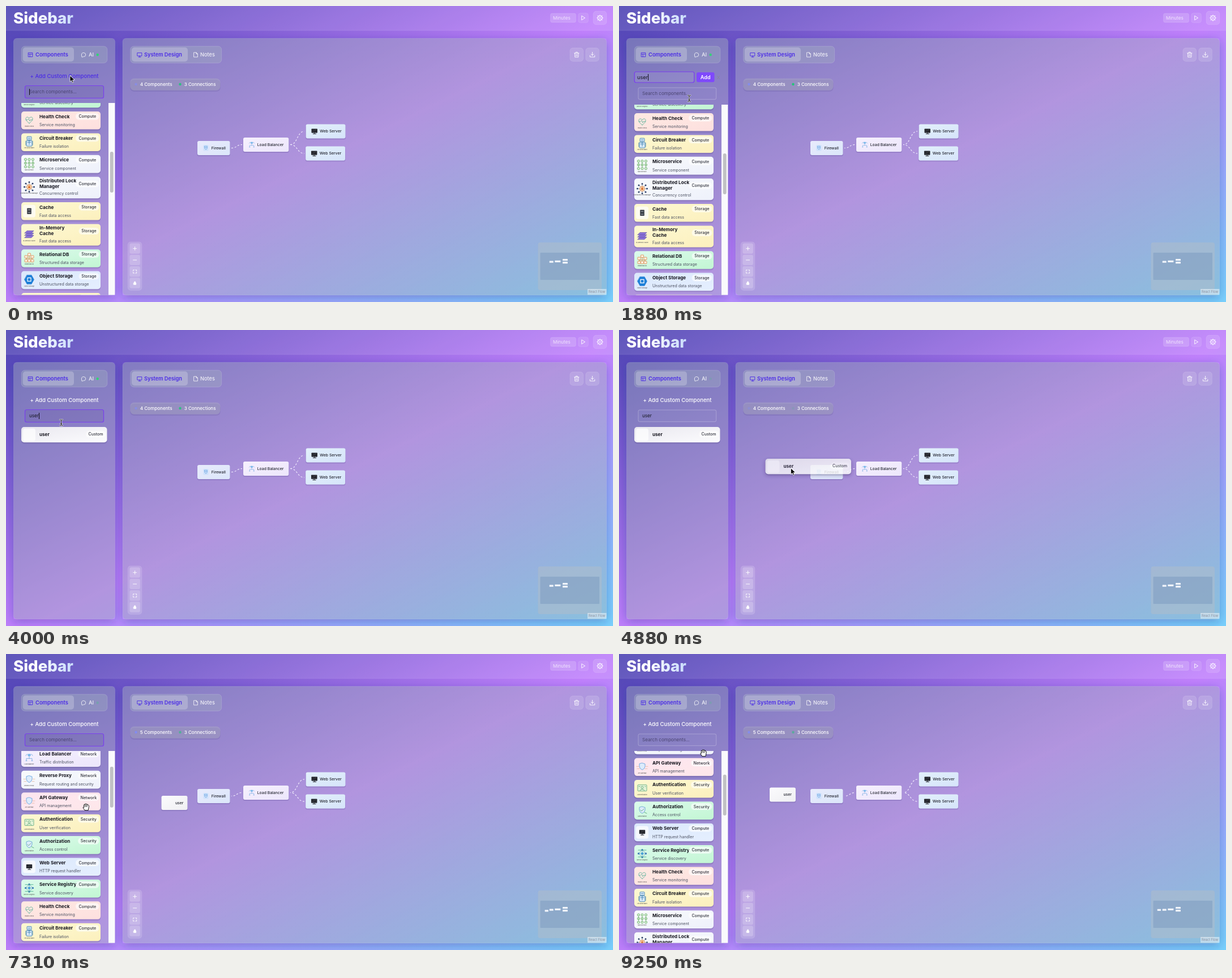
Write an HTML page that moves like this. It is 1072x522 px and loops after 9310 ms.

```html
<!DOCTYPE html>
<html lang="en">
<head>
<meta charset="utf-8">
<title>Sidebar</title>
<style>
html, body { margin: 0; width: 100%; height: 100%; overflow: hidden; background: #8a60dc; }
svg { display: block; width: 100vw; height: 100vh; font-family: Inter, "Open Sans", sans-serif; }
text { white-space: pre; }
</style>
</head>
<body>
<svg viewBox="0 0 1072 522">
  <defs>
    <linearGradient id="bg" x1="0" y1="0" x2="1" y2="1">
      <stop offset="0" stop-color="#4c43b2"/><stop offset=".52" stop-color="#c081fc"/><stop offset="1" stop-color="#78d0fb"/>
    </linearGradient>
    <linearGradient id="logo"><stop offset=".35" stop-color="#fff"/><stop offset="1" stop-color="#c9dcfd"/></linearGradient>
    <pattern id="dots" width="6.2" height="6.2" patternUnits="userSpaceOnUse"><circle cx="3" cy="3" r=".4" fill="#4a62c0" opacity=".15"/></pattern>
    <filter id="soft" x="-20%" y="-50%" width="140%" height="200%"><feGaussianBlur stdDeviation="3"/></filter>
    <filter id="glow" x="-30%" y="-30%" width="160%" height="160%"><feGaussianBlur stdDeviation="8"/></filter>
    <clipPath id="gaps"><path clip-rule="evenodd" d="M0 0H1072V522H0ZM13.3 57H192.5V510H13.3ZM206 57H1060.5V510H206Z"/></clipPath>
    <clipPath id="view"><rect x="13" y="171" width="180" height="338.5"/></clipPath>
    <clipPath id="viewLow"><rect x="13" y="174" width="180" height="335.5"/></clipPath>
  </defs>
  <g id="base"></g>
  <g id="live"></g>
</svg>
<script>
const LOOP = 9310, $ = id => document.getElementById(id);
const white = a => `rgba(255,255,255,${a})`;
const INK = '#16161f', GREY = '#4b5060', VIOLET = '#4a2be6';

const rect = (x, y, w, h, r, fill, more = '') =>
  `<rect x="${x}" y="${y}" width="${w}" height="${h}" rx="${r}" fill="${fill}" ${more}/>`;
const line = a => `stroke="${a}" stroke-width=".8"`;
const circle = (x, y, r, fill, more = '') => `<circle cx="${x}" cy="${y}" r="${r}" fill="${fill}" ${more}/>`;
// y is the visual middle of the line
const text = (s, x, y, size, weight = 400, fill = INK, more = '') =>
  `<text x="${x}" y="${y + size * .35}" font-size="${size}" font-weight="${weight}" fill="${fill}" ${more}>${s}</text>`;
const path = (d, color, w = .9, fill = 'none') =>
  `<path d="${d}" fill="${fill}" stroke="${color}" stroke-width="${w}" stroke-linecap="round" stroke-linejoin="round"/>`;
const at = (x, y, s, k = 1) => `<g transform="translate(${x} ${y}) scale(${k})">${s}</g>`;
const ring = (n, r, f) => Array.from({length: n}, (_, i) => f(r * Math.cos(i * 2 * Math.PI / n), r * Math.sin(i * 2 * Math.PI / n))).join('');
const spokes = (n, r, ink, dot) => ring(n, r, (x, y) => path(`M0 0L${x} ${y}`, ink, .6) + circle(x, y, 1.4, dot));

const shield = c => path('M0-6L5-4.4V0Q4.4 4.4 0 6Q-4.4 4.4-5 0V-4.4Z', c, .8, '#dcebfb');
const icons = {
  globe: circle(0, 0, 6, '#dcebfb', line('#4a8fd8')) + path('M-6 0H6M0-6Q-5 0 0 6Q5 0 0-6', '#4a8fd8', .6),
  wall: rect(-6, -7, 12, 14, 2, '#cfe2fb') + path('M-3-4H3V0Q2 3 0 4Q-2 3-3 0Z', '#4a8fd8', .8) + path('M-1.5-1H1.5', '#4a8fd8'),
  scale: rect(-2.5, -6, 5, 4, .8, '#7ab8ea') + path('M0-2V2M-5 6V2H5V6M-6 6H-4M4 6H6M-6-3Q-4-7-3-5M6-3Q4-7 3-5', '#6ba3dc', .8),
  shield: shield('#5a9bdc') + path('M-10 0H-6M6 0H10M-9 4H-5M5 4H9', '#e0a080', .6),
  cert: rect(-8, -6, 16, 11, 1, '#e3f2d5', line('#5aa67a')) + circle(0, -1.5, 2, 'none', line('#5aa67a')) + path('M-4 4Q0-1 4 4M-6-3H-4M5-3H6', '#5aa67a'),
  lock: shield('#5aa0c8') + path('M-3 0L-1 2L3-2M4 4L8 6', '#5aa67a'),
  screen: rect(-5.5, -4.5, 11, 7.5, .8, '#25272d') + path('M0 3V5M-2.5 5H3', '#25272d', 1.1) + path('M-4 1L3-3', '#4a4e58', .7),
  mesh: ring(4, 6.5, (x, y) => path(`M0 0L${x} ${y}M${x} ${y}L${-y} ${x}`, '#3e7bb8', .6) + circle(x, y, 1.6, '#3e7bb8')) + path('M-7-6H7M-7 6H7', '#3fa98a', .8) + circle(0, 0, 2.2, '#45a0d8'),
  heart: path('M0 6Q-7 1-6-3Q-4-7 0-3Q4-7 6-3Q7 1 0 6ZM-6 0H-3L-1-2L1 2L2 0H6', '#4fae95', .8),
  breaker: rect(-4, -9, 8, 6, 1, '#d7e9f7', line('#2f76ad')) + rect(-5, -2, 10, 10, 1, '#d7e9f7', line('#2f76ad')) + path('M0-3V5M-3 1H3M-6-1V6M6-1V6M-2-6H2', '#2f76ad', .8),
  cells: [0, 1, 2, 3, 4, 5, 6, 7, 8].map(i => circle(i % 3 * 6.5 - 6.5, (i / 3 | 0) * 6.5 - 7, 2.1, '#d8f0d6', line('#5da55c'))).join('') + path('M-6.5-5V4M0-5V4M6.5-5V4', '#5da55c', .5),
  hub: spokes(8, 8.5, '#53627a', '#2d3f66') + circle(0, 0, 4.4, '#f8d9b8', line('#e0823c')) + rect(-1.8, -1, 3.6, 3, .5, '#d96b24') + path('M-1-1V-2.4H1V-1', '#d96b24', .7),
  drive: rect(-4, -5.5, 8, 11, .8, '#3c4048') + path('M-2-2.5H2M-2 2.5H2', '#aab0ba', 1),
  layers: [4, 0, -4].map(y => path(`M-8 ${y + 2}L-4 ${y - 2}H8L4 ${y + 2}Z`, '#5a47a8', .7, '#8a72d8')).join(''),
  tables: path('M0-3V1M-5 4V1H5V4', '#d98a4c') + [[-2.5, -8], [-8, 3], [-2.5, 3], [3, 3], [-8, -4], [3, -4]].map(p => rect(p[0], p[1], 5, 4.5, .6, '#fdeedd', line('#d98a4c'))).join(''),
  hex: path('M-4-8H4L8.5 0L4 8H-4L-8.5 0Z', '#1d78cf', .5, '#1f80d8') + path('M-3-3H3V3H-3Z', '#fff', 1.2),
  bus: rect(-10.5, -10, 21, 18, 1, '#cfe8f8') + at(0, -1, spokes(4, 7, '#4b93cc', '#3f8fce') + ring(4, 7, (x, y) => circle(x + y * .8, y - x * .8, 1.1, '#3f8fce')) + rect(-2, -2, 4, 4, 1, '#3f8fce'))
};

const fills = {
  pink: ['#fde6f0', '#fee7ea'], red: ['#ffe9e2', '#fde0df'], yellow: ['#fdf8d2', '#fcf0bd'], green: ['#dcfaec', '#c2f6d3'],
  blue: ['#dbe8fb', '#e5efff'], slate: ['#f8fafc', '#eef1fb'], plain: ['#e9e8ef', '#fcfcfe'], lilac: ['#f6f0fe', '#ece6fb'],
  ice: ['#e2f0fb', '#d6e4fa'], dusk: ['#e8ebfc', '#dbe6fa'], chalk: ['#fbfbfd', '#efeff2']
};
document.querySelector('defs').insertAdjacentHTML('beforeend', Object.entries(fills).map(([k, [a, b]]) =>
  `<linearGradient id="${k}" x2="1" y2="1"><stop stop-color="${a}"/><stop offset="1" stop-color="${b}"/></linearGradient>`).join(''));

// title, subtitle, badge, fill, icon, white tile
const items = [
  ['DNS', 'Name resolution', 'Network', 'blue', 'globe'],
  ['CDN', 'Content delivery', 'Network', 'green', 'globe'],
  ['Firewall', 'Traffic filtering', 'Security', 'red', 'wall'],
  ['Load Balancer', 'Traffic distribution', 'Network', 'lilac', 'scale'],
  ['Reverse Proxy', 'Request routing and security', 'Network', 'slate', 'shield'],
  ['API Gateway', 'API management', 'Network', 'pink', 'shield'],
  ['Authentication', 'User verification', 'Security', 'yellow', 'cert'],
  ['Authorization', 'Access control', 'Security', 'green', 'lock'],
  ['Web Server', 'HTTP request handler', 'Compute', 'blue', 'screen', 1],
  ['Service Registry', 'Service discovery', 'Compute', 'green', 'mesh'],
  ['Health Check', 'Service monitoring', 'Compute', 'red', 'heart'],
  ['Circuit Breaker', 'Failure isolation', 'Compute', 'yellow', 'breaker'],
  ['Microservice', 'Service component', 'Compute', 'slate', 'cells'],
  ['Distributed Lock|Manager', 'Concurrency control', 'Compute', 'slate', 'hub'],
  ['Cache', 'Fast data access', 'Storage', 'yellow', 'drive', 1],
  ['In-Memory|Cache', 'Fast data access', 'Storage', 'yellow', 'layers'],
  ['Relational DB', 'Structured data storage', 'Storage', 'green', 'tables'],
  ['Object Storage', 'Unstructured data storage', 'Storage', 'blue', 'hex'],
  ['Block Storage', 'Volume storage', 'Storage', 'yellow', 'drive', 1],
  ['Pub/Sub Event|Bus', 'Event-driven communication', 'Messaging', 'blue', 'bus'],
  ['Intrusion Detection', 'Detects intrusions', 'Security', 'red', 'shield'],
  ['user', '', 'Custom', 'plain', '']
];
const badgeWidth = {Compute: 41.5, Storage: 36, Network: 37.5, Security: 37.5, Messaging: 45, Custom: 35};
const cardHeight = ([name, sub]) => !sub ? 27.3 : name.includes('|') ? 38 : 31.6;

function card(item, y, w) {
  const [name, sub, badge, fill, icon, tile] = item, h = cardHeight(item), rows = name.split('|');
  const two = rows.length > 1, bw = badgeWidth[badge], by = y + (two ? 12.6 : sub ? 8.8 : 12.7), mid = y + h / 2;
  let s = rect(26.5, y + 1, w + 1, h + 1.8, 6, 'rgba(40,30,90,.1)') + rect(27, y + 1, w, h, 5, 'rgba(40,30,90,.12)') + rect(27, y, w, h, 5, `url(#${fill})`);
  if (tile || !icon) s += rect(30, mid - 11, 22, 22, 4, white(.7));
  if (icon) s += at(41, mid - (tile ? 0 : 1), icons[icon], tile ? .95 : 1);
  if (icon && !tile) s += text(rows.join(' '), 41, mid + 10.4, 2.5, 500, '#555', 'text-anchor="middle"');
  rows.forEach((r, i) => s += text(r, 59, y + (two ? 7.2 + i * 10 : sub ? 8.7 : 12.8), 8.15, 650));
  if (sub) s += text(sub, 59, y + h - 8.2, 7.05, 400, GREY);
  return s + rect(27 + w - 2.5 - bw, by - 6, bw, 12, 6, white(.6)) +
    text(badge, 27 + w - 2.5 - bw / 2, by, 7.05, 500, '#30323c', 'text-anchor="middle"');
}

function node(x, y, w, label, tx, fill, icon) {
  return rect(x - .5, y + 1.5, w + 1, 25.5, 3.5, 'rgba(40,30,100,.14)') + rect(x, y, w, 25, 3, `url(#${fill})`) +
    (icon ? at(x + 15, y + 12.3, icons[icon], icon == 'screen' ? .95 : .75) : '') + text(label, tx, y + 12.5, 6.85, 500, '#23252f');
}

const button = (x, y, s) => rect(x, y, 23.5, 23.5, 5, white(.13), `stroke="${white(.18)}" stroke-width=".7"`) + at(x + 11.75, y + 11.75, s);
const panel = (x, w) => rect(x, 61, w, 453, 6, 'rgba(31,38,135,.32)', 'filter="url(#glow)" clip-path="url(#gaps)"') +
  rect(x, 57, w, 453, 6, 'rgba(158,174,184,.43)', `stroke="${white(.16)}" stroke-width=".7"`);
const tabs = (x, w, ax, aw) => rect(x, 71, w, 29.5, 6, 'rgba(165,185,190,.32)', `stroke="${white(.2)}" stroke-width=".8"`) + rect(ax, 73, aw, 25, 5, white(.22));

$('base').innerHTML =
  rect(0, 0, 1072, 522, 0, 'url(#bg)') + rect(0, 0, 1072, 43, 0, white(.1)) + rect(0, 42.8, 1072, .7, 0, white(.15)) +
  text('Sidebar', 13, 21, 27.6, 800, 'url(#logo)') +
  rect(961.5, 13, 45, 16, 3, white(.16), `stroke="${white(.2)}" stroke-width=".6"`) + text('Minutes', 966, 21, 8.2, 400, white(.72)) +
  rect(1010.5, 12.5, 18, 17, 4, white(.1), `stroke="${white(.15)}" stroke-width=".6"`) +
  at(1019.5, 21, path('M-2.5-3.5L3 0L-2.5 3.5Z', '#fff')) +
  button(1037.2, 9.3, ring(8, 4.9, (x, y) => path(`M${x * .85} ${y * .85}L${x} ${y}`, '#fff', 1.5)) + circle(0, 0, 4, 'none', line('#fff')) + circle(0, 0, 1.6, 'none', line('#fff'))) +
  panel(13.3, 179.2) + panel(206, 854.5) + rect(206, 57, 854.5, 453, 6, 'url(#dots)') +
  tabs(27.3, 151.5, 29.7, 90.3) + tabs(219.7, 161, 222, 99) +
  at(43.2, 86, path('M-3.6-3.6H3.6V3.6H-3.6ZM-3.6-1H3.6M-1-1V3.6', VIOLET)) + text('Components', 52, 86, 9.35, 600, VIOLET) +
  at(137, 86, path('M-3 3.8L-3.6 1Q-4-3.6 0-3.6Q3.8-3.4 3.8 0Q3.6 3.6 0 3.5Z', white(.85))) + text('AI', 146, 86, 9.3, 500, white(.85)) +
  at(236, 86, path('M-3.8-3.4H3.8V2H-3.8ZM0 2V4M-2 4H2', VIOLET)) + text('System Design', 244, 86, 9.25, 600, VIOLET) +
  at(335, 86, path('M-3-4H1L3.4-1.6V4H-3ZM1-4V-1.6H3.4', white(.85))) + text('Notes', 343, 86, 9.2, 500, white(.85)) +
  rect(219.3, 130, 159.4, 21, 7, 'rgba(50,40,110,.12)') + rect(219.3, 127.7, 159.2, 21, 7, 'rgba(172,172,195,.45)') +
  button(996, 74, path('M-4.2-2.6H4.2M-1.5-2.6V-4.4H1.5V-2.6M-3.3-2.6L-3 4.4H3L3.3-2.6M-1-.5V2.4M1-.5V2.4', '#fff', .85)) +
  button(1023.8, 74, path('M0-4.4V1.2M-2.4-1L0 1.4L2.4-1M-4.2 1.4V4.2H4.2V1.4', '#fff')) +
  rect(215, 416, 25, 85.5, 5, white(.14), `stroke="${white(.12)}" stroke-width=".7"`) +
  ['M-3 0H3M0-3V3', 'M-3 0H3', 'M-3-1V-2.8H-1.2M1.2-2.8H3V-1M3 1V2.8H1.2M-1.2 2.8H-3V1', 'M-2-.3H2V2.7H-2ZM-1-.3V-2.4H1V-.3'].map((d, i) =>
    rect(218.3, 418.4 + i * 20.3, 18.6, 18.4, 3, white(.2)) + at(227.6, 427.7 + i * 20.3, path(d, '#fff', .9, i > 2 ? '#fff' : 'none'))).join('') +
  rect(939.5, 417, 112.5, 84, 4, 'rgba(172,188,205,.6)') + rect(943.5, 435, 104.5, 48, 1, 'rgba(90,125,175,.28)') +
  [[959.7, 449.6, 7], [969.3, 448.8, 10], [983, 446, 9], [983, 451, 9]].map(([x, y, w]) => rect(x, y, w, 3.2, .4, '#f0f4fb')).join('') +
  rect(1027, 499, 33.5, 10.2, 0, white(.45)) + text('React Flow', 1029, 504.2, 5.6, 400, '#8c8c9a');

const beam = 'M-2.5-5.5Q0-5.5 0-4V4Q0 5.5-2.5 5.5M2.5-5.5Q0-5.5 0-4M2.5 5.5Q0 5.5 0 4M-1.2 2H1.2';
const cursors = {
  arrow: path('M0 0V10.5L2.6 8.2L4.4 12.2L6.2 11.4L4.5 7.5H8Z', '#fff', .8, '#000'),
  beam: path(beam, '#fff', 2) + path(beam, '#000', .9),
  hand: path('M-2.5 6L-5.2 1.8Q-5.5 0-3.2 1L-4-3Q-3.2-4.6-2.2-3L-2-4.6Q-1-6 0-4.4Q1.2-6 2-3.8Q3.6-4.8 4-2.6Q5.6-2.6 5.2 0L4 6Z', '#000', .9, '#fff') +
    path('M-1.8-3L-1.2 0M.2-4L.4 0M2.2-3.4L2 0', '#000', .7)
};
const moves = [
  [0, 113, 123], [450, 115, 125], [1600, 116, 128], [1880, 124, 163], [2350, 152, 126], [2550, 152, 126], [2950, 106, 152],
  [3310, 104, 157], [3900, 104, 157], [4250, 72, 188], [4400, 72, 188], [4880, 303.5, 244], [5150, 297, 262], [5300, 297, 262],
  [5800, 100, 152], [6700, 100, 152], [7000, 140, 268], [7690, 143, 271], [8150, 296, 262], [8300, 296, 262], [8650, 287.5, 247.5],
  [8800, 287.5, 247.5], [9250, 149, 174], [LOOP, 146, 172]
];
const ease = (t, a, b) => { const u = Math.min(1, Math.max(0, (t - a) / (b - a))); return u * u * (3 - 2 * u); };
const within = (t, ...spans) => spans.some(([a, b]) => t >= a && t < b);
const typed = (t, ...times) => 'user'.slice(0, times.filter(k => t >= k).length);
const pulse = (t, peak) => .55 + .45 * Math.cos((t - peak) * Math.PI / 1000);

function pointer(t) {
  const i = Math.max(1, moves.findIndex(m => m[0] > t)), [a, x, y] = moves[i - 1], [b, X, Y] = moves[i], k = ease(t, a, b);
  return [x + (X - x) * k, y + (Y - y) * k];
}

function list(t, query, low) {
  const all = query === '', top = 171 + low;
  const scroll = !all ? 0 : t < 4000 ? 369 : 177.5 * ease(t, 6850, 7600) + 2 * ease(t, 8850, 9200);
  let y = top - scroll, s = '';
  for (const it of items) {
    if (it[2] == 'Custom' && t < 2500 || !it[0].replace('|', ' ').toLowerCase().includes(query)) continue;
    const h = cardHeight(it);
    if (y > top - 45 && y < 512) s += card(it, y, all ? 140 : 151.5);
    y += h + 6.8;
  }
  if (all) s += rect(181, top, 11.3, 340, 0, '#fafafc') + rect(183.7, top + scroll * .233 - (t > 2500 && t < 4000 ? 2 : 0), 6, 72, 3, '#c1c1c4');
  return `<g clip-path="url(#view${low ? 'Low' : ''})">${s}</g>`;
}

function form(t, query, adding) {
  const low = adding ? 3 : 0, focus = within(t, [0, 500], [2950, 4250], [5800, 8250]);
  let s = '';
  if (adding) {
    const name = typed(t, 1150, 1320, 1500, 1700);
    s += rect(27.3, 116, 105.5, 19, 3, white(.08), 'stroke="#7a3bf0" stroke-width="1.2"') +
      text(name || 'Component name', 32, 125.5, 9.1, 400, name ? INK : 'rgba(50,45,80,.65)') +
      rect(32.3 + [0, 5.4, 10.2, 15.5, 18.9][name.length], 120, .9, 11.5, 0, '#000') +
      rect(137, 117, 31.5, 17.3, 3, '#7f49fb') + text('Add', 152.7, 125.6, 9.1, 600, '#fff', 'text-anchor="middle"') +
      text('X', 172.7, 125.8, 8.2, 400, '#85819a');
  } else s += text('+ Add Custom Component', 103, 124, 9.55, 500, t < 500 ? VIOLET : '#fff', 'text-anchor="middle"');
  s += focus ? rect(33.5, 140.5, 139, 22, 3, 'rgba(70,55,120,.12)', 'stroke="#7a40ee" stroke-width="1.2"')
             : rect(34, 141 + low, 137.7, 20.7, 2.5, white(.02), `stroke="${white(.32)}" stroke-width=".8"`);
  s += text(query || 'Search components...', 41, 151.3 + low, 8.15, 400, query ? INK : '#4a4470');
  if (focus && t < 5800) s += rect(41 + [0, 4.8, 9.2, 14, 17][query.length], 146, .9, 11, 0, '#000');
  return s + list(t, query, low);
}

function flow(t) {
  const dropped = t >= 5200, k = ease(t, 8300, 8650), ux = 274.5 - 8.5 * k, uy = 250 - 14.5 * k;
  const edge = d => `<path d="${d}" fill="none" stroke="#f4f1ff" stroke-width="1.1" stroke-dasharray="3 3" stroke-dashoffset="${-t % 500 / 500 * 6}"/>`;
  let s = circle(229.5, 138, 2.2, '#818cf8', `opacity="${pulse(t, 1550)}"`) + circle(307.5, 138, 2.2, '#22c57a', `opacity="${pulse(t, 1780)}"`) +
    circle(161.7, 86, 2.2, '#2fd673', `opacity="${pulse(t, 50)}"`) +
    text(`${dropped ? 5 : 4} Components`, 236.7, 138.2, 8.1, 500, '#fff') + text('3 Connections', 314.7, 138.2, 8.05, 500, '#fff') +
    edge('M398 250.5C408 250.5 407 244.5 417 244.5') + edge('M502 244.5C515 244.5 514 221 527 221') + edge('M502 244.5C515 244.5 514 260 527 260') +
    node(338, 238, 57.5, 'Firewall', 362.7, 'dusk', 'wall') + node(419, 232, 80.3, 'Load Balancer', 443.7, 'lilac', 'scale') +
    node(529.7, 208.5, 69.8, 'Web Server', 554.3, 'ice', 'screen') + node(529.2, 247.5, 69.8, 'Web Server', 553.8, 'ice', 'screen');
  if (dropped) s += node(ux, uy, 46, 'user', ux + 24.5, 'chalk') + rect(951.6 - k * .9, 451.3 - k * 1.6, 6.3, 3.2, .4, '#f0f4fb');
  return s;
}

function render(t) {
  const query = t < 5500 ? typed(t, 3450, 3570, 3700, 3830) : 'user'.slice(0, [6520, 6430, 6300, 6150].filter(k => t < k).length);
  const [x, y] = pointer(t);
  let s = flow(t) + form(t, query, within(t, [500, 2500]));
  if (within(t, [4400, 5200]))
    s += `<g opacity=".84" transform="translate(${x - 72} ${y - 188})">${rect(26, 173, 153.5, 28, 6, 'rgba(40,30,90,.3)', 'filter="url(#soft)"')}${card(items.at(-1), 171, 151.5)}</g>`;
  if (!within(t, [950, 1650], [3420, 3900], [5900, 6700]))
    s += at(x, y, cursors[t > 6850 ? 'hand' : within(t, [0, 500], [2200, 2700], [4100, 5650]) ? 'arrow' : 'beam']);
  $('live').innerHTML = s;
}

const start = performance.now();
(function tick() {
  render((performance.now() - start) % LOOP);
  requestAnimationFrame(tick);
})();
</script>
</body>
</html>
```
